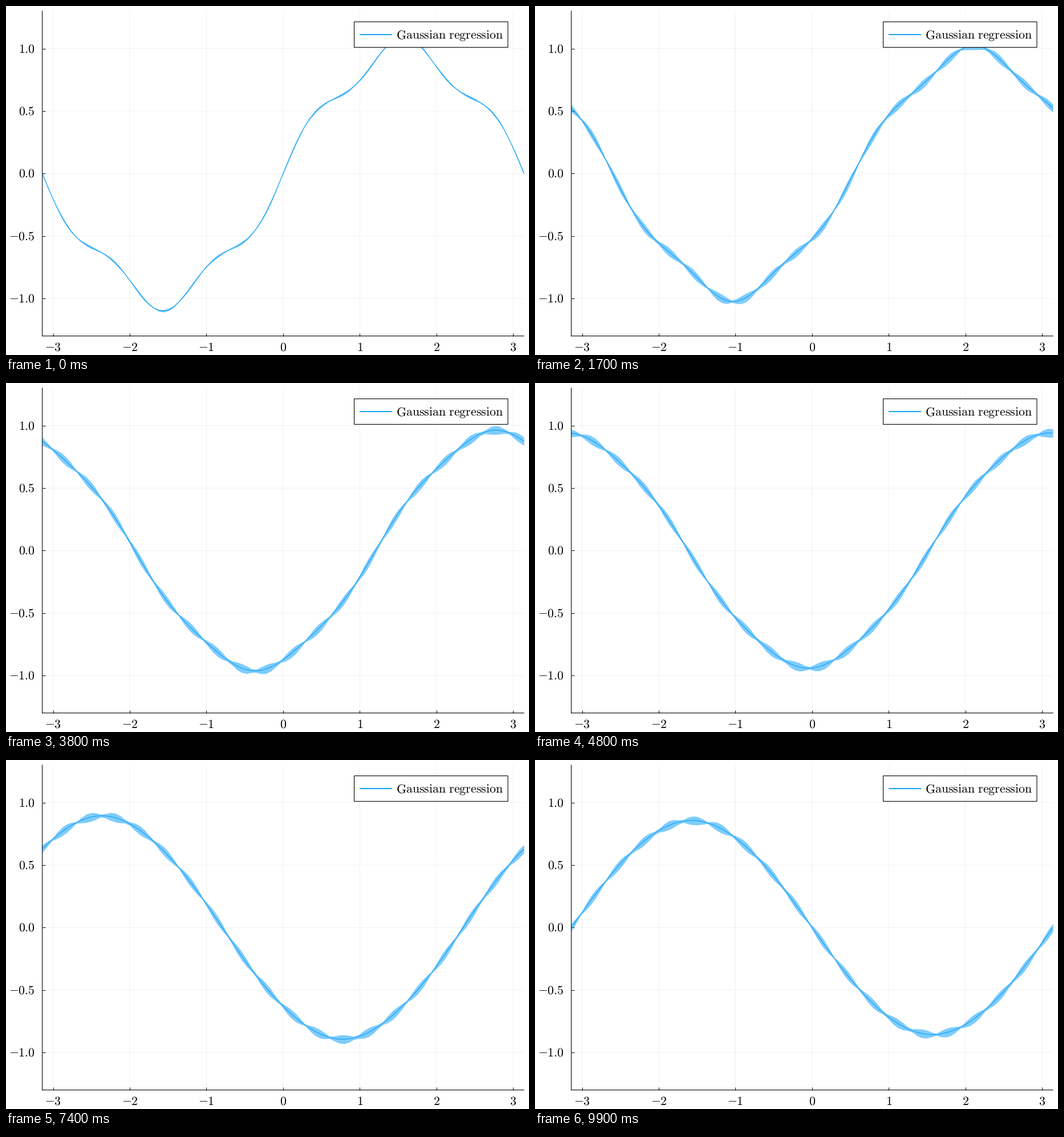
Write a matplotlib script that moves like this. It is 917x611 px and loops after 10000 ms.

```python
import numpy as np
import matplotlib.pyplot as plt
from matplotlib.animation import FuncAnimation
from matplotlib.patches import Rectangle

W, H, DPI = 917, 611, 100
PX = 72 / DPI                      # one pixel in points
LEFT, TOP, RIGHT, BOTTOM = 63.6, 8.9, 908.1, 577.7
FRAMES = 100
BLUE, INK = "#009afa", "black"
FONT = 21.82 * PX
SPEED, NU = 1.0, 0.05              # advection and diffusion

plt.rcParams["mathtext.fontset"] = "cm"
plt.rcParams["text.hinting"] = "no_hinting"

x = np.linspace(-np.pi, np.pi, 100)
times = np.linspace(0, np.pi, FRAMES)
lens = np.abs(np.sin(np.pi * (x + 0.045) / 0.331))


def mean(t):
    s = x - SPEED * t
    return np.exp(-NU * t) * np.sin(s) + 0.1 * np.exp(-25 * NU * t) * np.sin(5 * s)


def spread(t):
    return 0.0355 * np.sqrt(1 - 0.92 * np.exp(-t / 0.2)) * (0.15 + 0.85 * lens)


def label(px, py, text, ha):
    fig.text(px / W, 1 - py / H, f"${text}$", ha=ha, va="baseline",
             fontsize=FONT, color="black")


fig = plt.figure(figsize=(W / DPI, H / DPI), dpi=DPI, facecolor="white")
ax = fig.add_axes([LEFT / W, 1 - BOTTOM / H, (RIGHT - LEFT) / W, (BOTTOM - TOP) / H])
ax.set(xlim=(-np.pi, np.pi), ylim=(-1.3, 1.3),
       xticks=range(-3, 4), yticks=np.arange(-1, 1.1, 0.5))
ax.tick_params(direction="in", length=5 * PX, width=PX, color=INK,
               labelbottom=False, labelleft=False)
ax.grid(color="black", alpha=0.055, linewidth=PX, snap=False)
ax.set_axisbelow(True)
for side in ("top", "right"):
    ax.spines[side].set_visible(False)
for side in ("left", "bottom"):
    ax.spines[side].set(linewidth=1.1 * PX, color=INK, snap=False)

for v in ax.get_xticks():
    label(LEFT + (v + np.pi) / (2 * np.pi) * (RIGHT - LEFT), 604.5, f"{v:d}", "center")
for v in ax.get_yticks():
    label(51, BOTTOM - (v + 1.3) / 2.6 * (BOTTOM - TOP) + 7.5, f"{v:.1f}", "right")

band = ax.fill_between(x, mean(0), mean(0), color=BLUE, alpha=0.5, linewidth=0, zorder=3)
line, = ax.plot(x, mean(0), color=BLUE, linewidth=PX, zorder=4)

# legend, laid out in pixels
key = fig.add_axes([0, 0, 1, 1], zorder=5)
key.set(xlim=(0, W), ylim=(H, 0))
key.axis("off")
key.add_patch(Rectangle((610.5, 27.7), 269.5, 44.7, facecolor="white",
                        edgecolor=INK, linewidth=1.1 * PX, snap=False))
key.plot([620, 677], [50.2, 50.2], color=BLUE, linewidth=1.8 * PX,
         solid_capstyle="butt")
key.text(684, 58, r"$\mathrm{Gaussian\ regression}$", fontsize=FONT,
         ha="left", va="baseline", color="black")


def update(i):
    t = times[i]
    m, s = mean(t), spread(t)
    line.set_ydata(m)
    outline = np.column_stack([np.r_[x, x[::-1]], np.r_[m + s, (m - s)[::-1]]])
    band.set_verts([outline])
    return line, band


anim = FuncAnimation(fig, update, frames=FRAMES, init_func=lambda: update(0),
                     interval=100, repeat=True, repeat_delay=0)
plt.show()
```
